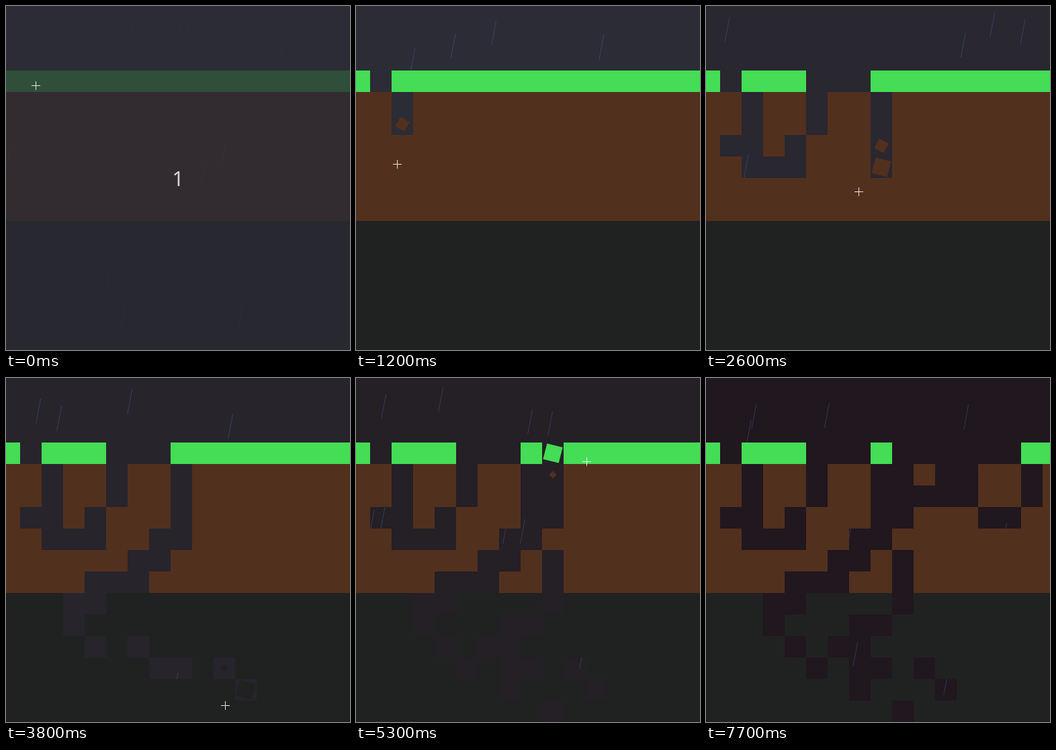
Animation of 512x512 px, one loop 7800 ms. Source, as an HTML page with a canvas:

```html
<!DOCTYPE html>
<html lang="en">
<head>
<meta charset="utf-8">
<title>Digging in the rain</title>
<style>
  html, body { margin: 0; width: 100%; height: 100%; overflow: hidden; background: #292c34; }
  canvas { display: block; width: 512px; height: 512px; }
</style>
</head>
<body>
<canvas id="stage" width="512" height="512"></canvas>
<script>
const ctx = document.getElementById('stage').getContext('2d');
const SIZE = 512, STEPS = 78, STEP = 100; // px, steps per loop, ms per step
const TILE = 32, LEFT = -11, TOP = 96, COLS = 17, ROWS = 13;
const GRASS = '#44dd55', DIRT = '#52301e', STONE = '#202221';
const SHRINK = 4; // steps until a dug tile is gone
const DUSK = [43, 44, 53], NIGHT = [33, 23, 30], DARKEN_FROM = 12;
const FALL = 190, DRIFT = -37, PER_SHOWER = 4; // rain, px per step

// Digging strokes: first step, last step, column, row, moves by compass letter.
// The hits of a stroke are evenly spaced in time.
const strokes = [
  [7, 8, 1, 0, 'se'],
  [10, 10, 2, 2, ''],
  [12, 22, 2, 4, 'nw e se e n ne n n e e se s'],
  [24, 25, 8, 3, 's'],
  [26, 32, 7, 4, 's w s w w s w s se'],
  [33, 34, 6, 9, 'se e'],
  [35, 37, 10, 10, 'se'],
  [39, 49, 9, 12, 'wwn wwn een n e en n n nn n'],
  [50, 52, 9, 1, 'n'],
  [53, 60, 10, 0, 'e e e e es s ws'],
  [62, 66, 13, 3, 'wn n'],
  [67, 69, 11, 1, 's w']
];

// Cursor stops between the strokes: step, x, y
const stops = [
  [0, 44, 118], [6, 44, 118], [12, 61, 235], [26, 227, 276],
  [38, 326, 487], [53, 343, 124], [65, 377, 161], [73, 345, -10]
];

const tileX = c => LEFT + c * TILE;
const tileY = r => TOP + r * TILE;
const lerp = (a, b, p) => Math.round(a + (b - a) * p);
const clamp = v => Math.min(1, Math.max(0, v));

const dugAt = new Map();
const route = new Map();
for (const [from, to, c0, r0, moves] of strokes) {
  const list = moves ? moves.split(' ') : [];
  let c = c0, r = r0;
  ['', ...list].forEach((move, i) => {
    for (const way of move) {
      c += (way === 'e') - (way === 'w');
      r += (way === 's') - (way === 'n');
    }
    const time = from + (to - from) * i / Math.max(1, list.length);
    dugAt.set(c + ',' + r, time);
    route.set(time, [tileX(c) + TILE / 2, tileY(r) + TILE / 2]);
  });
}
for (const [t, x, y] of stops) route.set(t, [x, y]);
const path = [...route].sort((a, b) => a[0] - b[0]);

function cursorAt(step) {
  const i = path.findIndex(([t]) => t > step);
  if (i < 0) return path[path.length - 1][1];
  const [[t0, a], [t1, b]] = [path[i - 1], path[i]];
  return a.map((v, j) => lerp(v, b[j], (step - t0) / (t1 - t0)));
}

function hash(n) {
  const s = Math.sin(n * 127.1) * 43758.5453;
  return s - Math.floor(s);
}

function drawRain(step) {
  ctx.strokeStyle = 'rgba(70, 108, 172, 0.4)';
  ctx.lineWidth = 1;
  ctx.beginPath();
  for (let age = 0; age < 3; age++) {
    for (let i = 0; i < PER_SHOWER; i++) {
      const seed = (step - age + 5) * 9 + i;
      const x = hash(seed) * 540 + age * DRIFT;
      const y = hash(seed + 0.5) * 70 + age * FALL;
      ctx.moveTo(x, y);
      ctx.lineTo(x - 7, y + 37);
    }
  }
  ctx.stroke();
}

function drawTiles(step) {
  for (let r = 0; r < ROWS; r++) {
    ctx.fillStyle = r === 0 ? GRASS : r < 7 ? DIRT : STONE;
    for (let c = 0; c < COLS; c++) {
      const p = clamp((step - (dugAt.get(c + ',' + r) ?? STEPS)) / SHRINK);
      const side = TILE * (1 - p);
      ctx.save();
      ctx.translate(tileX(c) + TILE / 2, tileY(r) + TILE / 2);
      ctx.rotate(p);
      ctx.fillRect(-side / 2, -side / 2, side, side);
      ctx.restore();
    }
  }
}

function draw(ms) {
  const now = Math.floor(ms / STEP) % STEPS;
  const step = now === 1 || now === 6 ? now - 1 : now; // two short rests
  const shown = Math.min(1, Math.max(1, step) / 5);
  const dark = clamp((step - DARKEN_FROM) / (STEPS - 1 - DARKEN_FROM));
  const sky = `rgb(${DUSK.map((v, i) => lerp(v, NIGHT[i], dark))})`;

  ctx.globalAlpha = 1;
  ctx.fillStyle = sky;
  ctx.fillRect(0, 0, SIZE, SIZE);

  ctx.globalAlpha = shown;
  drawRain(step);
  drawTiles(step);

  ctx.globalAlpha = 1 - shown;
  ctx.fillStyle = '#fff';
  ctx.font = '500 31px "Noto Sans", "Open Sans", sans-serif';
  ctx.textAlign = 'center';
  ctx.fillText('1', 256, 268);

  ctx.globalAlpha = 0.87;
  const [x, y] = cursorAt(step);
  ctx.fillRect(x - 6, y, 13, 1);
  ctx.fillRect(x, y - 6, 1, 6);
  ctx.fillRect(x, y + 1, 1, 6);
}

const start = performance.now();
function tick() {
  draw(performance.now() - start);
  requestAnimationFrame(tick);
}
tick();
</script>
</body>
</html>
```
